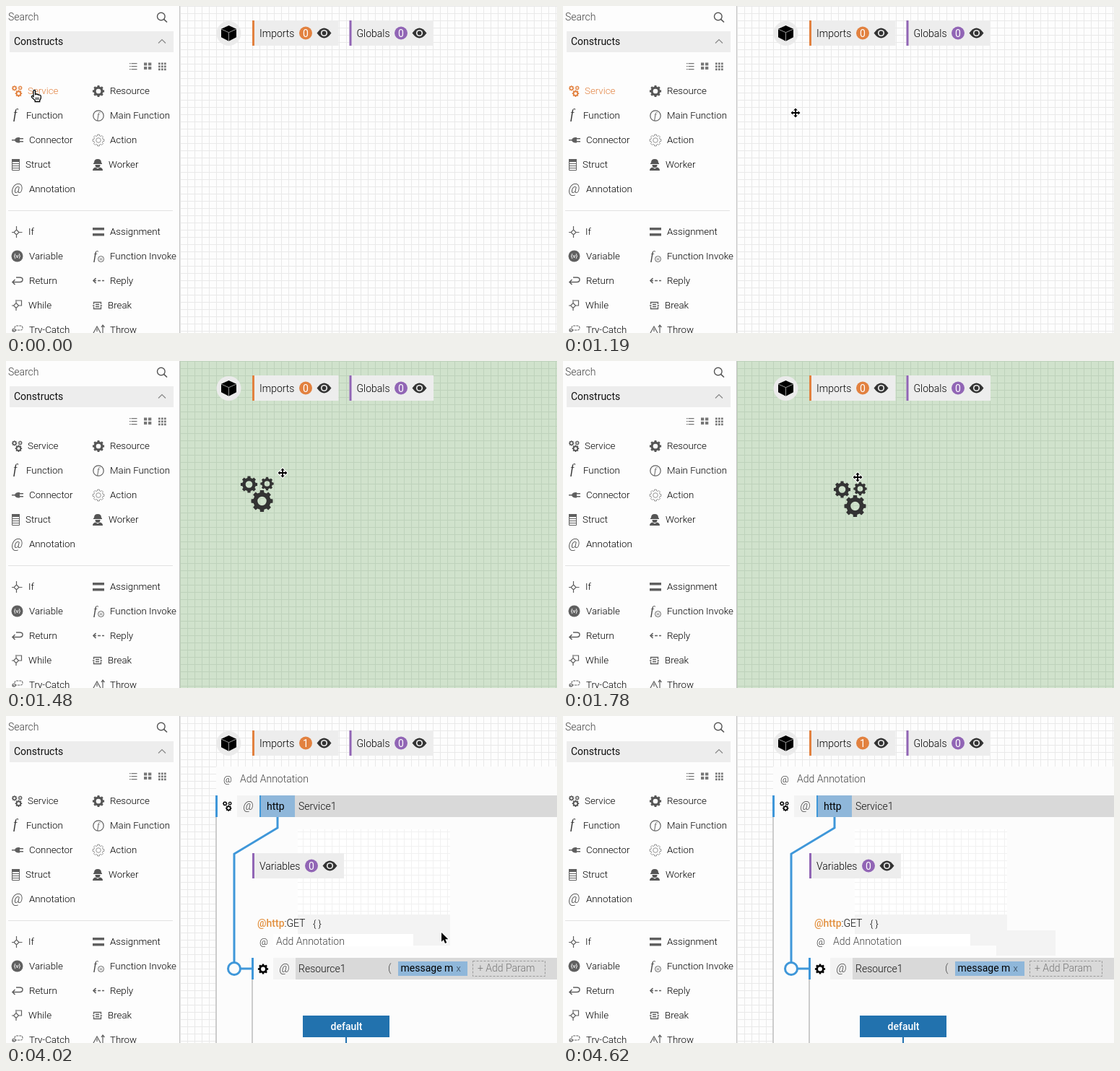
Animation of 763x453 px, one loop 5.07 s. Source, as an HTML page with a canvas:

```html
<!DOCTYPE html>
<html lang="en">
<head>
<meta charset="utf-8">
<title>Dragging a service onto the canvas</title>
<style>
html, body { margin: 0; width: 100%; height: 100%; overflow: hidden; background: #fff; }
canvas { display: block; }
</style>
</head>
<body>
<canvas id="stage" width="763" height="453"></canvas>
<script>
const c = document.getElementById('stage').getContext('2d');
const LOOP = 5070, ORANGE = '#e2813f', PURPLE = '#9165b5', BLUE = '#3f97d9', ICON = '#606060';

// start time, cursor, its position, then the dragged icon's position
const steps = [
  [0, 'hand', 34, 115.5], [750, 'hand', 44, 115.5], [900, 'hand', 153, 124.5],
  [1040, 'move', 274, 139], [1190, 'move', 322, 148],
  [1330, 'move', 322, 148, 289, 153], [1480, 'move', 383, 155, 325, 159],
  [1630, 'move', 407, 160, 335, 160], [1780, 'move', 408, 161, 375, 166],
  [3280, 'arrow', 406.5, 159.5], [4020, 'arrow', 602.5, 299.5],
  [4170, 'arrow', 669.5, 354.5], [4320, 'arrow', 668.5, 346.5],
  [4470, 'arrow', 704.5, 438.5], [4620, 'none', 0, 0]
];

function rect(x, y, w, h, color) {
  c.fillStyle = color;
  c.fillRect(x, y, w, h);
}
function text(s, x, y, color = '#000', size = 14, weight = 300, family = 'Roboto, sans-serif') {
  c.font = `${weight} ${size}px ${family}`;
  c.fillStyle = color;
  c.fillText(s, x, y);
}
function serif(s, x, y, size, color = ICON) {
  text(s, x, y, color, size, 'italic 400', '"Liberation Serif", serif');
}
function stroke(d, color = ICON, width = 1.2, dash = []) {
  c.strokeStyle = color;
  c.lineWidth = width;
  c.setLineDash(dash);
  c.stroke(new Path2D(d));
  c.setLineDash([]);
}
function fill(d, color = ICON) {
  c.fillStyle = color;
  c.fill(new Path2D(d));
}
function disc(x, y, r, color) {
  c.beginPath();
  c.arc(x, y, r, 0, 7);
  c.fillStyle = color;
  c.fill();
}
function ring(x, y, r, color = ICON, width = 1.2) {
  c.beginPath();
  c.arc(x, y, r, 0, 7);
  c.strokeStyle = color;
  c.lineWidth = width;
  c.stroke();
}
function at(x, y, scale, draw) {
  c.save();
  c.translate(x, y);
  c.scale(scale, scale);
  draw();
  c.restore();
}

// Eight blunt teeth, one of them pointing straight right
function gear(x, y, r, color, outline) {
  c.beginPath();
  for (let i = 0; i < 8; i++) {
    for (const [turn, k] of [[-.24, .8], [-.17, 1], [.17, 1], [.24, .8]]) {
      const a = i * Math.PI / 4 + turn;
      c.lineTo(x + r * k * Math.cos(a), y + r * k * Math.sin(a));
    }
  }
  c.closePath();
  c.moveTo(x + r * .41, y);
  c.arc(x, y, r * .41, 0, 2 * Math.PI);
  c.fillStyle = c.strokeStyle = color;
  c.lineWidth = .9;
  outline ? c.stroke() : c.fill('evenodd');
}
function gears(x, y, scale, color) {
  at(x, y, scale, () => {
    gear(11.5, 12, 11.7, color);
    gear(36.5, 11, 9.3, color);
    gear(29.5, 35, 15.2, color);
  });
}
function annotation(x, y, size) {
  text('@', x, y, '#444', size, 'italic 300');
}
function eye(x, y) {
  fill(`M${x - 10} ${y}Q${x} ${y - 14} ${x + 10} ${y}Q${x} ${y + 14} ${x - 10} ${y}Z`, '#333');
  disc(x, y, 4.6, '#eee');
  disc(x, y, 2.9, '#333');
}
function chip(x, y, w, label, count, color, badge) {
  rect(x, y, w, 35, '#ededed');
  rect(x, y, 3, 35, color);
  text(label, x + 10, y + 23);
  disc(badge, y + 17.5, 9, color);
  c.textAlign = 'center';
  text(count, badge, y + 22.5, '#fff', 14, 400);
  c.textAlign = 'left';
  eye(badge + 25.5, y + 17.5);
}
// Ten pixel cells counted from the canvas corner beside the sidebar
function grid(x, y, w, h, color) {
  for (let i = Math.ceil((x - 1) / 10) * 10 + 1; i < x + w; i += 10) rect(i, y, 1, h, color);
  for (let i = Math.ceil(y / 10) * 10; i < y + h; i += 10) rect(x, i, w, 1, color);
}

const rows = [
  [117, 'Service', 30, 'Resource', 144], [151, 'Function', 28, 'Main Function', 144],
  [185, 'Connector', 32, 'Action', 144], [219, 'Struct', 27, 'Worker', 142],
  [253, 'Annotation', 32], [312, 'If', 31, 'Assignment', 144],
  [346, 'Variable', 32, 'Function Invoke', 144], [380, 'Return', 32, 'Reply', 144],
  [414, 'While', 31, 'Break', 141], [448, 'Try-Catch', 32, 'Throw', 144]
];

function leftIcons(active) {
  gears(8, 110, .32, active ? ORANGE : '#555');
  serif('f', 10, 156, 18, '#333');
  rect(8, 185, 5, 1.5, ICON);
  fill('M12 185.7Q13 182 17 182H19V189.5H17Q13 189.5 12 185.7Z');
  rect(19, 183, 5, 1.5, ICON);
  rect(19, 187, 5, 1.5, ICON);
  stroke('M8.5 212.5H18.5V227.5H8.5ZM8.5 218.5H18.5M8.5 221.5H18.5M8.5 224.5H18.5', ICON, 1);
  rect(8, 212, 11, 4, ICON);
  annotation(7.5, 259, 18);
  stroke('M14.5 310L18 313.5L14.5 317L11 313.5ZM14.5 305V310M8 313.5H11M18 313.5H22.5M14.5 317V321');
  disc(15.5, 346.5, 8, ICON);
  text('{v}', 10.8, 349, '#fff', 8, 500);
  stroke('M12.5 379L9 382.5L12.5 386M9 382.5H19Q23 382.5 23 379Q23 376 19 376H14', ICON, 1.5);
  stroke('M14 411.5L17.5 415L14 418.5L10.5 415ZM14 407V411.5M8 415H10.5M14 418.5V422M17.5 415H21.5V408H15');
  stroke('M12 446Q12 443 15 443H20Q23 443 23 446Q23 449 20 449H12Q9 449 9 452', ICON, 1.1, [3, 1]);
  ring(11, 449, 2);
}
function rightIcons() {
  gear(128, 118, 8.2, '#555');
  ring(128, 152, 7.2);
  serif('f', 126, 156, 12);
  gear(128, 186, 8, '#888', true);
  fill('M122 217Q122 212 127 212Q132 212 132 217L133 218V219H121V218ZM123.5 220H130.5Q130.5 224 127 224Q123.5 224 123.5 220ZM120 228Q120 224 124 223.5L127 225.5L130 223.5Q134 224 134 228Z', '#555');
  rect(120, 307, 16, 3.5, ICON);
  rect(120, 315, 16, 3.5, ICON);
  serif('f', 121, 351, 17, '#444');
  ring(131.5, 350.5, 4, ICON, 1);
  stroke('M129.5 351.5H133.5M129.5 349.7H133.5', ICON, .7);
  stroke('M124.5 377L121 380.5L124.5 384', ICON, 1.6);
  stroke('M121 380.5H136', ICON, 1.6, [4, 2]);
  stroke('M121.5 413V410.5H131.5V413M121.5 416.5V419.5H131.5V416.5', ICON, 1.4);
  stroke('M120 415H122.5M130.5 415H133M124 413.5H129M124 416.5H129', ICON, 1.3);
  stroke('M121 453L126 444L131 453M126 447V451M134 453V442.5M132 445L134 442L136.5 445');
}

function sidebar(active) {
  rect(0, 0, 240, 453, '#fdfdfd');
  rect(240, 0, 1, 453, '#c4c4c4');
  text('Search', 3, 20, '#444');
  ring(214.8, 14.5, 5.3, '#555', 1.4);
  stroke('M218.6 18.3L223 22.5', '#555', 1.6);
  rect(5, 35, 227, 29, '#ededed');
  text('Constructs', 11, 54, '#111', 14, 400);
  stroke('M211 51.5L216 46.5L221 51.5', '#888');
  for (let i = 0; i < 3; i++) {
    rect(171, 79 + i * 4, 1.5, 1.3, '#777');
    rect(173.5, 79 + i * 4, 8, 1.3, '#777');
    for (let j = 0; j < 3; j++) {
      rect(211 + j * 4, 78.5 + i * 4, 2.7, 2.7, '#777');
      if (i < 2 && j < 2) rect(191 + j * 6, 78.5 + i * 5.5, 4.3, 4, '#777');
    }
  }
  rect(3, 283, 228, 1, '#e2e2e2');
  for (const [y, a, ax, b, bx] of rows) {
    text(a, ax, y + 5, active && y === 117 ? ORANGE : '#000', 13.3);
    if (b) text(b, bx, y + 5, '#000', 13.3);
  }
  leftIcons(active);
  rightIcons();
}

function header(imports) {
  disc(308.5, 38, 17, '#ebebeb');
  fill('M308.5 27L319 31.7V43.3L308.5 48.7L298 43.3V31.7Z', '#000');
  stroke('M298 32L308.5 36.7L319 32M308.5 36.7V49', '#bbb', .8);
  chip(341, 20, 119.5, 'Imports', imports, ORANGE, 415);
  chip(475.5, 20, 116.5, 'Globals', 0, PURPLE, 547);
}

function service(t) {
  rect(291, 70, 472, 383, '#fcfcfc');
  if (t >= 4020) {
    rect(404, 157, 211, 118, '#fff');
    grid(404, 157, 211, 118, '#f1f1f1');
    rect(404, 275, 211, 43, '#f3f3f3');
    if (t >= 4170) rect(600, 297, 82, 35, '#f3f3f3');
    rect(370, 302, 194, 17, '#fff');
  }
  rect(290, 140, 2, 313, '#ccc');
  text('@', 301, 91.5, '#222', 13);
  text('Add Annotation', 324, 92, '#444');

  rect(291, 110, 472, 30, '#d9d9d9');
  rect(293, 110, 27, 30, '#fcfcfc');
  rect(320, 110, 31, 30, '#f3f3f3');
  rect(351, 110, 2, 30, BLUE);
  rect(353, 110, 47, 30, '#8fb7da');
  rect(290, 110, 3, 30, BLUE);
  gears(300, 118, .28, '#000');
  annotation(328.5, 130, 16);
  text('http', 361, 130, '#000', 14, 400);
  text('Service1', 405, 130, '#111');

  stroke('M376 140V155L316 191V341M325 350H341', BLUE, 3);
  ring(316, 350, 8.5, BLUE, 3);
  chip(341, 190, 127, 'Variables', 0, PURPLE, 423);

  text('@http', 348, 292, '#e2903f', 14, 500);
  text(':GET', 385.5, 292);
  text('{ }', 425, 292, '#000', 13);
  text('@', 351, 316.5, '#222', 13);
  text('Add Annotation', 374, 317, '#444');

  rect(340, 365, 2, 88, '#ccc');
  rect(341, 335, 422, 30, '#d9d9d9');
  rect(343, 335, 27, 30, '#fcfcfc');
  rect(370, 335, 31, 30, '#f3f3f3');
  rect(340, 335, 3, 30, BLUE);
  gear(356, 350.5, 7.2, '#000');
  annotation(378.5, 355, 16);
  text('Resource1', 405, 355, '#111');
  text('(', 529, 354, '#444');
  rect(543, 340, 96, 20, '#8fb7da');
  text('message m', 546.5, 354, '#000', 14, 400);
  text('x', 623.5, 353.5, '#345', 13);
  stroke('M646.5 339.5H746.5V360.5H646.5Z', '#999', 1, [3, 2]);
  text('+ Add Param', 653, 354, '#777');

  rect(411, 415, 120, 30, '#2272ae');
  text('default', 449.5, 435, '#fff', 14, 500);
  rect(470, 445, 2, 8, '#2272ae');
}

const cursors = {
  hand() {
    const shape = 'M4 10V2.6Q4 1 5.3 1Q6.6 1 6.6 2.6V7Q8.3 5.8 9.2 7.2Q10.8 6.5 11.6 8Q14 7.3 14.3 9.5V12.3L12.7 15.4V17H6.2V15.4L2 11.4Q.8 9.4 2.2 9Q3 8.8 4 10Z';
    fill(shape, '#fff');
    stroke(shape, '#000', 1.3);
    stroke('M7.3 11V14.5M9.2 11V14.5M11.1 11V14.5', '#000', .9);
  },
  move() {
    const shape = 'M0 -6.5L2.8 -3.5H1V-1H3.5V-2.8L6.5 0L3.5 2.8V1H1V3.5H2.8L0 6.5L-2.8 3.5H-1V1H-3.5V2.8L-6.5 0L-3.5 -2.8V-1H-1V-3.5H-2.8Z';
    stroke(shape, '#fff', 2);
    fill(shape, '#000');
  },
  arrow() {
    const shape = 'M.5 .5V13.2L3.4 10.6L5.5 15.6L7.8 14.6L5.7 9.8H9.8Z';
    stroke(shape, '#fff', 2);
    fill(shape, '#000');
  },
  none() {}
};

function draw(t) {
  const [, cursor, x, y, iconX, iconY] = steps.findLast(s => s[0] <= t);
  const dragging = iconX !== undefined, dropped = t >= 3280;
  rect(0, 0, 763, 453, dragging ? '#d0e2cc' : '#fdfdfd');
  grid(241, 0, 522, 453, dragging ? '#bed2bb' : '#e9e9e9');
  sidebar(t < 1330);
  header(dropped ? 1 : 0);
  if (dropped) service(t);
  if (dragging) gears(iconX, iconY, 1, '#333');
  at(x, y, 1, cursors[cursor]);
}

const start = performance.now();
function tick() {
  draw((performance.now() - start) % LOOP);
  requestAnimationFrame(tick);
}
tick();
</script>
</body>
</html>
```
